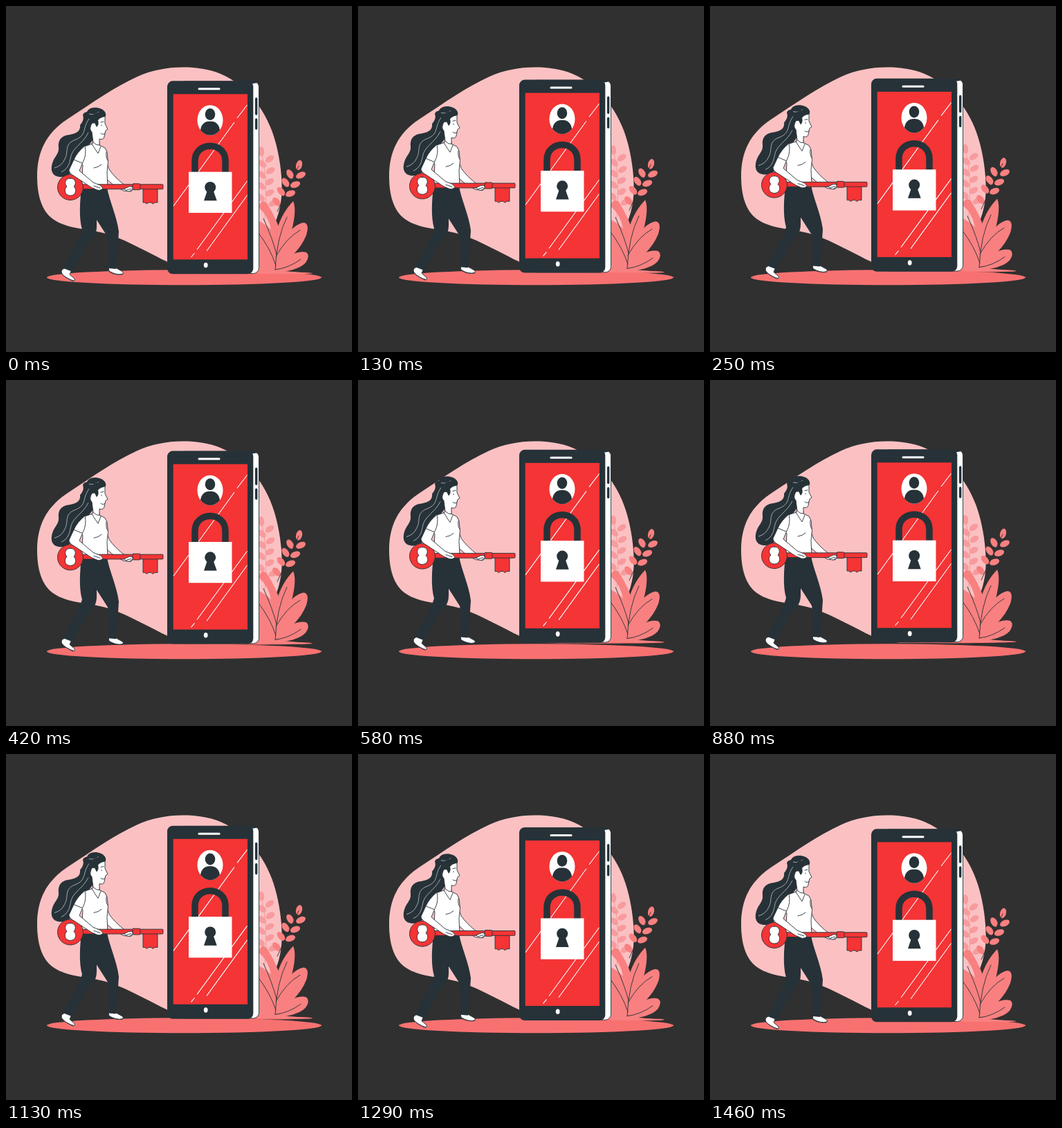
Recreate the animation shown at these times as an HTML page. Size 500 px wide and 500 px high, loop 1500 ms.

```html
<!DOCTYPE html>
<html lang="en">
<head>
<meta charset="utf-8">
<title>Key and phone</title>
<style>
  html, body { margin: 0; width: 100%; height: 100%; overflow: hidden; background: #303030; }
  svg { display: block; width: 100%; height: 100%; }
  .dark { fill: #263238; }
  .white { fill: #fff; }
  .red { fill: #f43435; }
  .leaf { fill: #f98080; }
  .pale { fill: #f79b9e; }
  .ink { stroke: #263238; stroke-width: .9; stroke-linejoin: round; stroke-linecap: round; }
  .line { fill: none; }
  .shine { fill: none; stroke: #fff; stroke-width: 1.1; }
</style>
</head>
<body>
<svg viewBox="0 0 500 500">
  <path fill="#fbc1c2" d="M45 246C45 211 58 184 88 164C126 139 157 117 190 102C210 93 232 88.500 256 88.500C275 88.500 293 91 310 98C351 115 379 157 389 195C397 223 402 264 396 290C391 315 379 335 362 349C330 377 280 389 236 371C206 357 178 340 151 331C118 320 91 324 68 308C51 296 45 272 45 246Z"/>
  <ellipse cx="257.500" cy="392.300" rx="198.500" ry="11" fill="#f87171"/>

  <g id="scene">
    <ellipse cx="350" cy="386" rx="93" ry="2.200" fill="#f87171"/>

    <g id="paleSprig" class="pale"></g>
    <path class="line" stroke="#f79b9e" d="M369 210Q379 250 374 310"/>
    <g id="darkSprig" class="leaf"></g>
    <path class="ink line" d="M423 231Q408 262 392 297"/>

    <g class="leaf">
      <path d="M366 287Q371 279 377 285Q392 309 398 331L390 382L383 323Q379 303 366 292Z"/>
      <path d="M362 309Q374 314 384 324L394 364L390 384L362 386Z"/>
      <path d="M390 380C383 337 393 305 415 282C423 299 409 347 390 380Z"/>
      <path d="M390 381C391 348 409 317 430 313Q439 314 434 331C426 352 408 367 390 381Z"/>
      <path d="M390 382C403 362 421 352 434 356Q440 361 433 371C423 381 407 383 390 386Z"/>
    </g>
    <path class="ink line" d="M364 327Q382 350 390 375M372 307Q386 338 391 359M389 381Q391 335 406 305M390 362Q405 335 425 324M389 381Q408 379 426 366"/>
    <path class="leaf" d="M364 379L391 382L426 385L443 387H364Z"/>

    <g id="phone">
      <rect class="white ink" x="250" y="109" width="115.500" height="277.500" rx="8"/>
      <rect class="dark" x="233" y="108.300" width="124.300" height="279" rx="8"/>
      <path class="dark" d="M345 108.300H358Q361 108.500 363 111L352 113Z"/>
      <path class="ink" style="stroke-width:3.4" d="M361.700 134V156M361.700 164V177"/>
      <rect class="red" x="241.700" y="127.300" width="107.300" height="239"/>
      <rect class="white" x="277.500" y="118.300" width="32" height="3" rx="1.500"/>
      <ellipse class="white" cx="288.700" cy="374.500" rx="2.900" ry="3.700"/>
      <path class="shine" d="M348.500 143L334 162M330 168L242 289M348.500 253L276 352M272.500 357L267.500 363M348.500 273.500L290 354"/>

      <clipPath id="badge"><ellipse cx="295" cy="165" rx="18.500" ry="21.800"/></clipPath>
      <g clip-path="url(#badge)">
        <rect class="white" x="276" y="143" width="38" height="44"/>
        <path class="dark" d="M281 190V179Q283 166.500 295 166.500T309 179V190Z"/>
        <ellipse cx="295" cy="157" rx="8.200" ry="9.500" class="white"/>
        <ellipse cx="295" cy="156.500" rx="7.300" ry="8.500" class="dark"/>
      </g>

      <path fill="none" stroke="#263238" stroke-width="9.500" d="M273 242V224C273 195 317 195 317 224V242"/>
      <rect class="white" x="264" y="239.700" width="62.500" height="59.200"/>
      <circle class="dark" cx="295.200" cy="262" r="8"/>
      <path class="dark" d="M291.500 265H299L304.700 281.300H286Z"/>
    </g>

    <g id="woman">
      <path class="dark" d="M111 158C112 152 117 155 118 151C123 144 139 146 143 153Q146 158 142 161L133 170L127 190C123 200 112 207 105 221C100 234 94 247 80 247C66 247 64 237 67 227C70 217 77 214 76 204C75 190 84 187 92 186C104 184 108 179 107 172C111 167 113 163 111 158Z"/>
      <path fill="none" stroke="#d8dcdf" stroke-width=".7" d="M120 163C110 177 117 186 101 193C83 199 91 211 85 221Q81 231 70 234M119 183C110 201 95 204 93 221Q91 235 80 240M120 156Q128 158 134 153"/>

      <path class="white ink" d="M148 377L149 383Q159 389 168 388Q171 385 167 383L158 378Z"/>
      <path class="white ink" d="M86 378L81 381Q78 386 85 391L95 397Q100 399 99 394L92 388L95 381Z"/>
      <path class="ink line" d="M149 384Q159 390 169 387M80 386Q86 394 98 397"/>
      <path class="dark" d="M109 262H146C149 281 160 303 163 326C162 345 160 362 159 380L148 379C148 361 149 346 147 334L131 309C131 319 132 327 126 335C113 350 105 368 96 384L83 379C92 358 105 341 110 323C105 306 107 281 109 262Z"/>

      <path class="white ink" d="M142 214L149 236Q157 248 173 260L181 262Q185 266 180 268L170 267Q151 258 142 246Z"/>
      <path class="white ink" d="M126 187L125 199L113 203L104 225L111 230L109 263H147L146 240Q149 225 146 211L143 205L135 201L134 190Z"/>
      <path class="white ink" d="M127 169C122 166 119 177 124 182L126 197Q131 202 135 201L135 192Q141 194 142 189L143 184L144 180L147 178L143 170V159Q134 159 127 169Z"/>
      <path class="dark" d="M121 168C119 157 132 151 143 155L143 160Q136 161 133 165Q135 171 131 175L128 169Q122 168 123 178Z"/>
      <path class="ink line" d="M138 172v1M137 168l4-1M137 184Q140 187 143 184M124 199Q130 209 133 213L137 203M127 234Q134 233 138 229M145 211Q144 219 147 223"/>

      <g class="red ink">
        <path d="M198 264V284H201L203 286L206 284H210L212 286L215 284H219V264Z"/>
        <rect x="105" y="257.800" width="122" height="6.800" rx="1"/>
        <rect x="183" y="256.800" width="11" height="8.800" rx="1.500"/>
        <circle cx="93" cy="262" r="18.500"/>
      </g>
      <path class="white ink" d="M93 249C101 249 102 257 98 261C103 265 101 274 93 274S83 265 88 261C84 257 85 249 93 249Z"/>

      <path class="white ink" d="M114 202Q103 211 98 222L91 237Q91 242 99 246L123 262L132 266Q138 267 140 263L136 259L126 255L106 238L111 226Q117 215 114 202Z"/>
      <path class="ink line" d="M98 222L110 227M127 260L136 263"/>
      <path class="white ink" d="M171 264L178 261Q184 260 183 265L178 268Q173 268 171 264Z"/>
      <path class="ink line" d="M174 266L181 264"/>
    </g>
  </g>
</svg>
<script>
  const scene = document.getElementById("scene");

  // Each leaflet: x, y, tilt in degrees
  function addLeaflets(id, leaflets, rx, ry) {
    document.getElementById(id).innerHTML = leaflets.map(([x, y, tilt]) =>
      `<ellipse rx="${rx}" ry="${ry}" transform="translate(${x} ${y}) rotate(${tilt})"/>`).join("");
  }

  addLeaflets("paleSprig", [
    [369, 210, -5], [381, 221, 55], [370, 228, -50], [382, 238, 60], [370, 244, -50],
    [381, 254, 60], [369, 260, -50], [381, 270, 60], [368, 277, -50], [386, 285, 60]
  ], 4.2, 7);
  addLeaflets("darkSprig", [
    [423.5, 230, 15], [410.5, 243, -30], [426, 244.5, 65], [404, 255, -35],
    [418, 258, 70], [397.5, 268, -40], [411, 271, 70], [391, 283, -40]
  ], 4.4, 7.4);

  const FPS = 24, LAST = 35, LOOP = 1500, RISE = 20;

  function draw(now) {
    const step = Math.min(LAST, Math.floor((now % LOOP) * FPS / 1000 + 0.05));
    const lift = RISE * Math.min(step, LAST - step) / LAST;
    scene.setAttribute("transform", `translate(0 ${-lift})`);
    requestAnimationFrame(() => draw(performance.now() - start));
  }

  const start = performance.now();
  draw(0);
</script>
</body>
</html>
```
